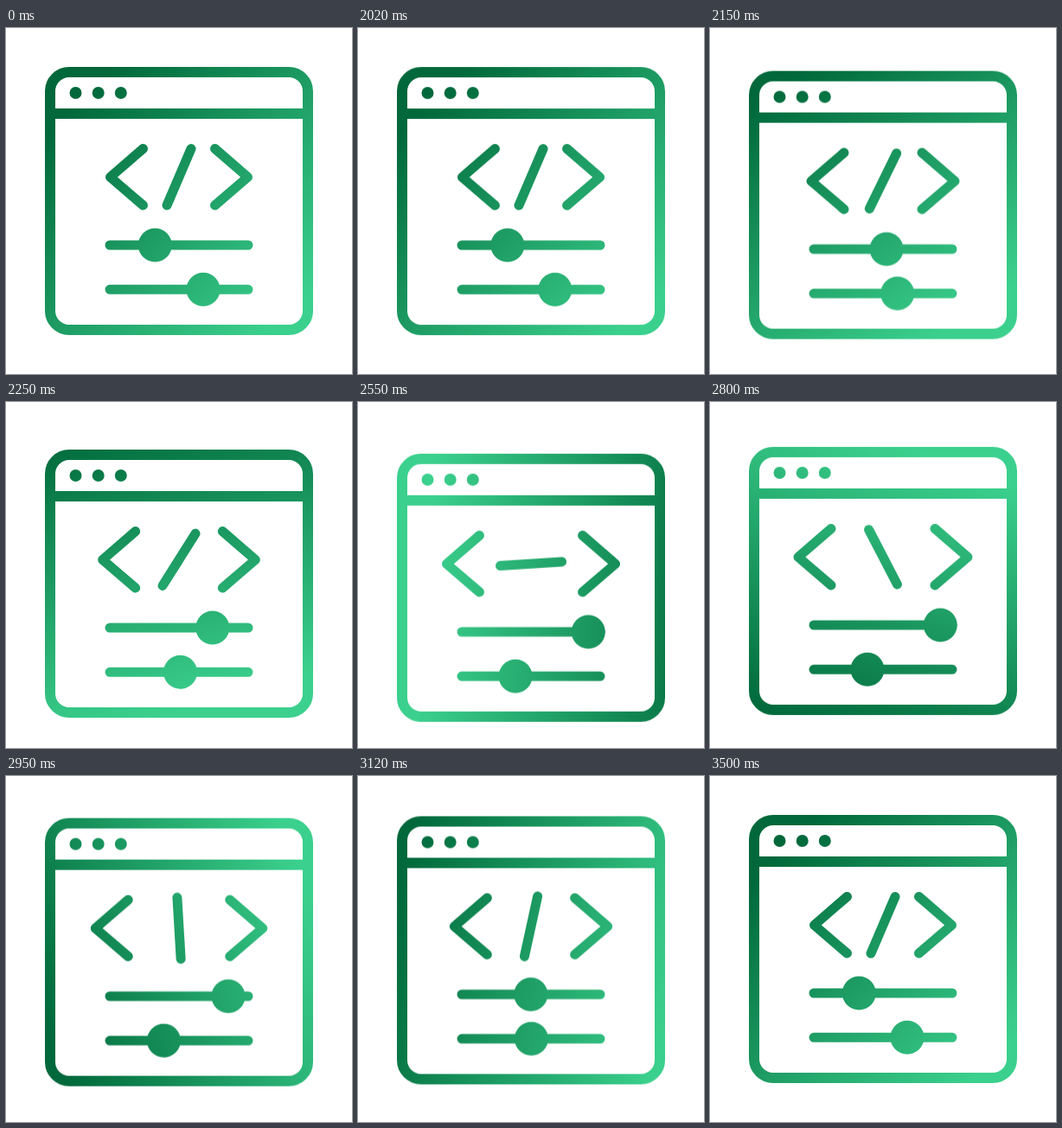
An HTML page for the animation above (3520 ms loop, 400 by 400 pixels).

```html
<!DOCTYPE html>
<html lang="en">
<head>
<meta charset="utf-8">
<title>Code window</title>
<style>
  html, body { margin: 0; width: 100%; height: 100%; overflow: hidden; background: #fff; }
  svg { display: block; width: 100vw; height: 100vh; }

  .bob, .hue, .drift, .slash, .left, .right, .knob1, .knob2 {
    animation: 3520ms cubic-bezier(.33, 0, .4, 1) infinite;
  }
  .bob { animation-name: bob; }
  .hue { animation-name: hue; transform-origin: 200px 200px; }
  .drift { animation-name: drift; }
  .slash { animation-name: slash; transform-origin: 200px 172.3px; }
  .left, .right { animation-name: spread; }
  .left { --dx: -18.5px; }
  .right { --dx: 18.5px; }
  .knob1 { animation-name: knob1; }
  .knob2 { animation-name: knob2; }

  @keyframes bob {
    0%, 56.82% { transform: translateY(0); }
    71.2% { transform: translateY(15px); animation-timing-function: cubic-bezier(.2, 0, .2, 1); }
    99.43%, 100% { transform: translateY(0); }
  }
  @keyframes drift {
    0%, 56.82% { transform: translateX(15px); }
    71.2% { transform: translateX(-45px); animation-timing-function: cubic-bezier(.2, 0, .2, 1); }
    99.43%, 100% { transform: translateX(15px); }
  }
  @keyframes hue {
    0%, 56.82% { transform: rotate(45deg); animation-timing-function: cubic-bezier(.36, 0, .45, 1); }
    99.43%, 100% { transform: rotate(405deg); }
  }
  @keyframes slash {
    0%, 56.82% { transform: rotate(0deg); animation-timing-function: cubic-bezier(.49, 0, .32, 1); }
    99.43%, 100% { transform: rotate(180deg); }
  }
  @keyframes spread {
    0%, 56.82% { transform: translateX(0); }
    75.28%, 81.25% { transform: translateX(var(--dx)); }
    99.7%, 100% { transform: translateX(0); }
  }
  @keyframes knob1 {
    0%, 56.82% { transform: translateX(0); }
    70.45%, 81.53% { transform: translateX(94px); }
    95.17%, 100% { transform: translateX(0); }
  }
  @keyframes knob2 {
    0%, 56.82% { transform: translateX(0); }
    73%, 82.95% { transform: translateX(-46px); }
    99.43%, 100% { transform: translateX(0); }
  }
</style>
</head>
<body>
<svg viewBox="0 0 400 400">
  <defs>
    <linearGradient id="green" gradientUnits="userSpaceOnUse" x1="20" y1="0" x2="365" y2="0">
      <stop offset="0" stop-color="#00683a"/>
      <stop offset="1" stop-color="#3bd08d"/>
    </linearGradient>
    <mask id="icon" maskUnits="userSpaceOnUse" x="0" y="0" width="400" height="400">
      <g fill="none" stroke="#fff" stroke-width="11" stroke-linecap="round" stroke-linejoin="round">
        <rect x="51" y="51" width="298" height="298" rx="22" stroke-width="12"/>
        <path d="M51 99H349" stroke-width="12" stroke-linecap="butt"/>
        <path class="left" d="M158.5 139.5L120.5 172.3L158.5 205"/>
        <path class="right" d="M241.5 139.5L279.5 172.3L241.5 205"/>
        <path class="slash" d="M214 139.5L186 205"/>
        <path d="M120 251H280M120 302.3H280"/>
      </g>
      <g fill="#fff">
        <circle cx="80.5" cy="75" r="7"/>
        <circle cx="106.7" cy="75" r="7"/>
        <circle cx="132.8" cy="75" r="7"/>
        <circle class="knob1" cx="172.3" cy="251" r="19.5"/>
        <circle class="knob2" cx="228" cy="302.3" r="19.5"/>
      </g>
    </mask>
  </defs>
  <!-- The gradient sheet turns behind the icon mask -->
  <g class="bob">
    <g mask="url(#icon)">
      <g class="hue">
        <rect class="drift" x="-200" y="-200" width="800" height="800" fill="url(#green)"/>
      </g>
    </g>
  </g>
</svg>
</body>
</html>
```
